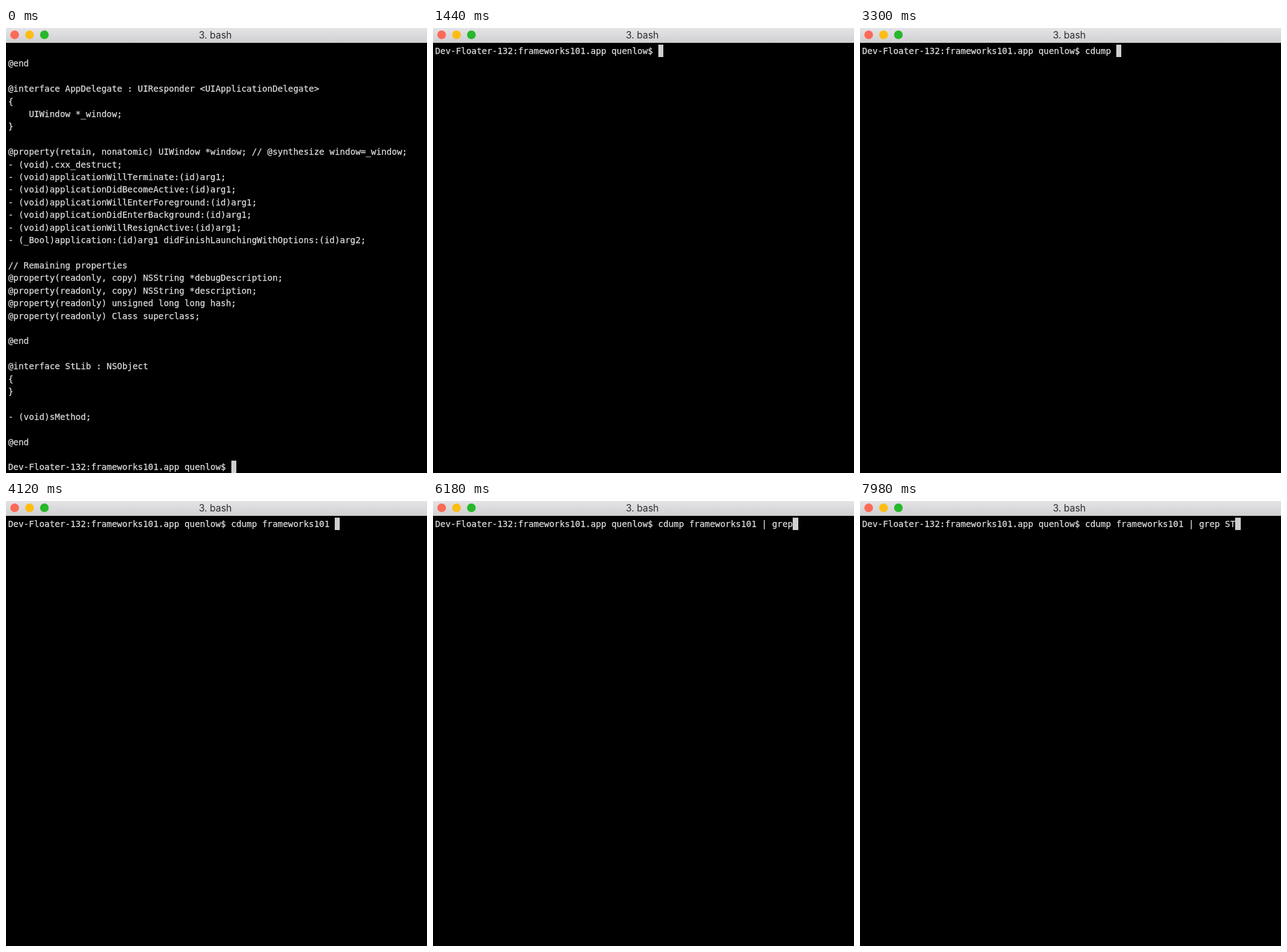
An HTML page that plays this animation: 680 by 720 pixels, repeating every 8000 ms.

```html
<!DOCTYPE html>
<html lang="en">
<head>
<meta charset="utf-8">
<title>Terminal</title>
<style>
  html, body { margin: 0; width: 100%; height: 100%; overflow: hidden; background: #000; }
  #stage { position: relative; width: 680px; height: 720px; overflow: hidden; background: #000; }
  #bar {
    position: absolute; inset: 0 0 auto; height: 24px;
    background: linear-gradient(#e4e3e6, #d0cfd2);
    font: 15.3px/23px Inter, Roboto, sans-serif; color: #2b2b2b;
  }
  #bar b { position: absolute; top: 3.7px; width: 14.6px; height: 14.6px; border-radius: 50%; }
  #bar span { position: absolute; left: 338px; transform: translateX(-50%); white-space: pre; }
  #screen {
    position: absolute; left: 3.5px; top: 27px; margin: 0;
    font: 13.92px/20.4px "DejaVu Sans Mono", monospace; color: #dedede;
    -webkit-text-stroke: 0.25px #dedede;
  }
  #cursor {
    display: inline-block; width: 1ch; height: 20.4px;
    vertical-align: top; background: #cfcfcf;
  }
</style>
</head>
<body>
<div id="stage">
  <div id="bar">
    <b style="left:6.7px;background:#fc6a57"></b>
    <b style="left:30.7px;background:#fdbd14"></b>
    <b style="left:54.7px;background:#27b82b"></b>
    <span>3. bash</span>
  </div>
  <pre id="screen"><span id="text"></span><span id="cursor"></span></pre>
</div>
<script>
const LOOP = 8000;
const CLEAR_AT = 400;
const PROMPT = "Dev-Floater-132:frameworks101.app quenlow$ ";

const LISTING = `
@end

@interface AppDelegate : UIResponder <UIApplicationDelegate>
{
    UIWindow *_window;
}

@property(retain, nonatomic) UIWindow *window; // @synthesize window=_window;
- (void).cxx_destruct;
- (void)applicationWillTerminate:(id)arg1;
- (void)applicationDidBecomeActive:(id)arg1;
- (void)applicationWillEnterForeground:(id)arg1;
- (void)applicationDidEnterBackground:(id)arg1;
- (void)applicationWillResignActive:(id)arg1;
- (_Bool)application:(id)arg1 didFinishLaunchingWithOptions:(id)arg2;

// Remaining properties
@property(readonly, copy) NSString *debugDescription;
@property(readonly, copy) NSString *description;
@property(readonly) unsigned long long hash;
@property(readonly) Class superclass;

@end

@interface StLib : NSObject
{
}

- (void)sMethod;

@end

`;

// Each entry: time in ms, text that appears then
const KEYS = [
  [1900, "c"], [2060, "d"], [2320, "u"], [2500, "m"], [2700, "p"], [2960, " "],
  [3500, "f"], [3680, "r"], [4060, "ameworks101 "], [4600, "|"], [4820, " "],
  [5380, "g"], [5600, "r"], [5780, "e"], [5980, "p"], [6400, " "],
  [7000, "S"], [7300, "T"],
];

const text = document.getElementById("text");

function contentAt(time) {
  if (time < CLEAR_AT) return LISTING + PROMPT;
  return PROMPT + KEYS.filter(([at]) => at <= time).map(([, key]) => key).join("");
}

function draw() {
  const content = contentAt(performance.now() % LOOP);
  if (text.textContent !== content) text.textContent = content;
  requestAnimationFrame(draw);
}
draw();
</script>
</body>
</html>
```
